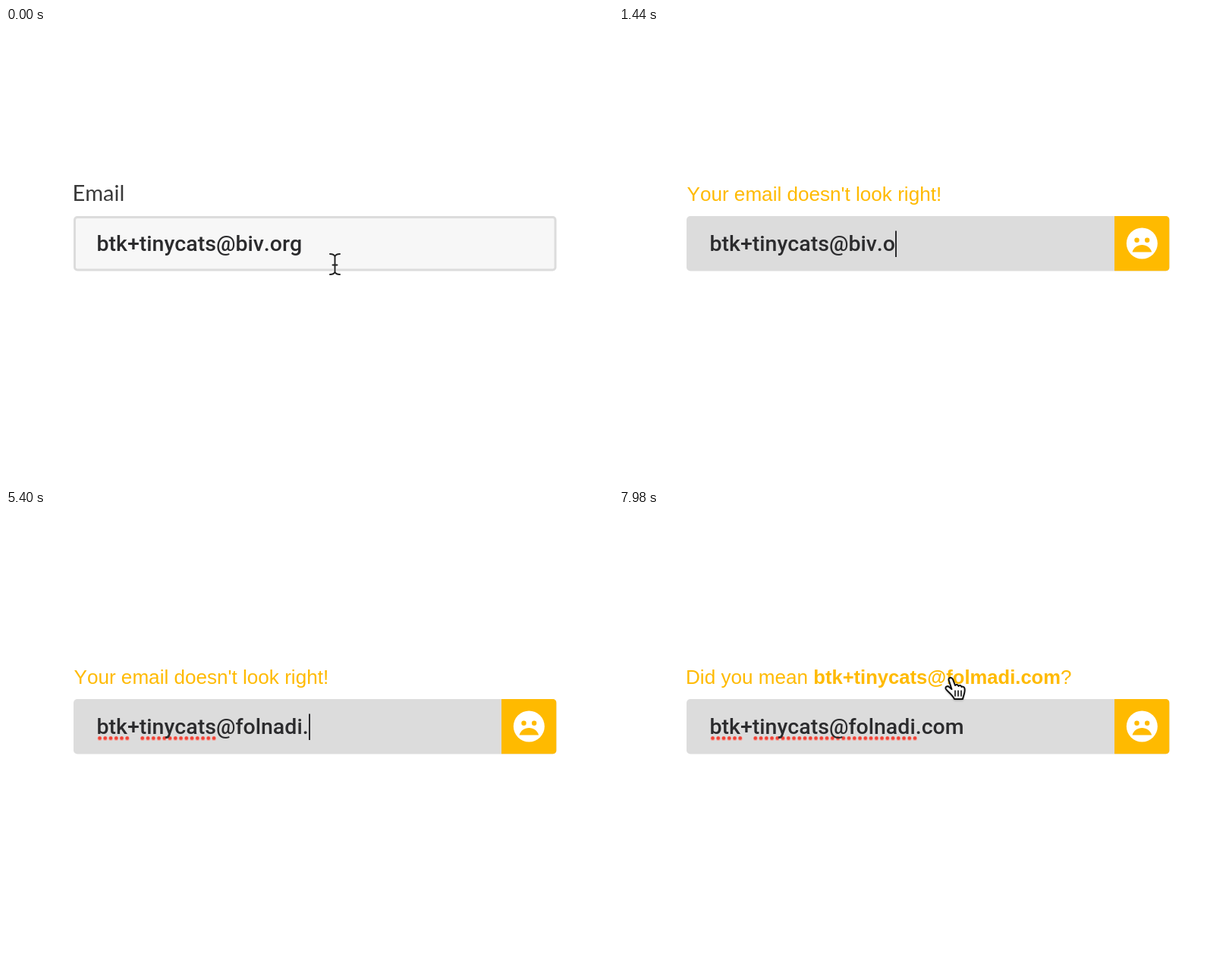
Write an HTML page with a canvas that moves like this. It is 800 by 600 pixels and loops after 8 s.

```html
<!DOCTYPE html>
<html lang="en">
<head>
<meta charset="utf-8">
<title>Email field</title>
<style>
  html, body { margin: 0; width: 100%; height: 100%; overflow: hidden; background: #fff; }
  canvas { display: block; }
</style>
</head>
<body>
<canvas id="stage" width="800" height="600"></canvas>
<script>
const ctx = document.getElementById("stage").getContext("2d");
ctx.fontKerning = "none";
const LOOP = 8000, BLINK = 560;
const AMBER = "#ffba00", GREY = "#dcdcdc", INK = "#2b2b2d";
const FIELD_FONT = "500 28.5px Roboto, sans-serif";
const BOX = { x: 89, y: 248, w: 636.5, h: 72.5, r: 5 };
const TEXT_X = 119.5;

const START_TEXT = "btk+tinycats@biv.org";
// Keystrokes as [time, key]; "<" is backspace.
const KEYS = [
  [1040, "<"], [1240, "<"], [1900, "<"], [2080, "<"], [2260, "<"], [2440, "<"], [2840, "<"],
  [3860, "f"], [4020, "o"], [4180, "l"], [4340, "n"], [4500, "a"], [4640, "d"], [4820, "i"],
  [5400, "."], [5620, "c"], [5840, "o"], [6080, "m"]
];

const clamp = v => Math.max(0, Math.min(1, v));
const span = (t, from, to) => clamp((t - from) / (to - from));
const easeOut = (p, power = 1.8) => 1 - (1 - p) ** power;
const smooth = p => p * p * (3 - 2 * p);
const mix = (a, b, p) => a + (b - a) * p;

const hand = new Path2D("M6 5C4 1 9-1 11 3L14 11C15 9 18 10 18.5 12C19.5 10 22 11 22.5 13" +
  "C24 12 26 13 26.5 15C27.5 20 25 24 24 29L13 29C11 24 5 20 2 16C0 13 4 11 6 13L9.5 16Z");
const handLines = new Path2D("M14 18v7M18 18v7M22 18v7");
const beam = new Path2D("M-6.5-13.5Q-1-13.5 0-10Q1-13.5 6.5-13.5M0-10V10M-3 1H3" +
  "M-6.5 13.5Q-1 13.5 0 10Q1 13.5 6.5 13.5");
const frown = new Path2D("M0 2C-6 2-11 5.5-12.8 11.5H12.8C11 5.5 6 2 0 2Z");

function write(text, x, y, font, color) {
  ctx.font = font;
  ctx.fillStyle = color;
  ctx.fillText(text, x, y);
  return x + ctx.measureText(text).width;
}

function dot(x, y, r, color) {
  ctx.fillStyle = color;
  ctx.beginPath();
  ctx.arc(x, y, r, 0, 7);
  ctx.fill();
}

function fieldWidth(text) {
  ctx.font = FIELD_FONT;
  return ctx.measureText(text).width;
}

function typedAt(t) {
  let text = START_TEXT, last = 480;
  for (const [time, key] of KEYS) {
    if (time > t) break;
    text = key === "<" ? text.slice(0, -1) : text + key;
    last = time;
  }
  return { text, last };
}

function drawLabel(t) {
  const out = span(t, 1040, 1230);
  if (out === 1) return;
  ctx.globalAlpha = 1 - out;
  write("Email", 87.5, 228 - 8 * out, "400 29px Lato, sans-serif", "#3a3a3a");
  ctx.globalAlpha = 1;
}

function drawMessage(t, shown) {
  const y = 228 + 72 * (1 - shown);
  const font = "26.1px 'Liberation Sans', Arial, sans-serif";
  ctx.globalAlpha = shown;
  if (t >= 1380 && t < 6120) {
    write("Your email doesn't look right!", 89.5, y, font, AMBER);
  } else {
    const guess = t < 1380 ? START_TEXT : "btk+tinycats@folmadi.com";
    let x = write("Did you mean ", 88, y, font, AMBER);
    x = write(guess, x, y, "bold 25.6px 'Liberation Sans', Arial, sans-serif", AMBER);
    write("?", x, y, font, AMBER);
  }
  ctx.globalAlpha = 1;
}

function drawBox(t) {
  const { x, y, w, h, r } = BOX;
  const level = Math.round(mix(247, 220, span(t, 440, 640)));
  ctx.fillStyle = GREY;
  ctx.beginPath();
  ctx.roundRect(x, y, w, h, r);
  ctx.fill();
  ctx.fillStyle = `rgb(${level},${level},${level})`;
  ctx.beginPath();
  ctx.roundRect(x + 3, y + 3, w - 6, h - 6, 2);
  ctx.fill();
}

function drawBadge(shown) {
  const { x, y, w, h, r } = BOX, shift = 72 * (1 - shown);
  ctx.save();
  ctx.beginPath();
  ctx.rect(x, y, w, h);
  ctx.clip();
  ctx.globalAlpha = shown;
  ctx.fillStyle = AMBER;
  ctx.beginPath();
  ctx.roundRect(653 + shift, y, x + w - 653, h, [0, r, r, 0]);
  ctx.fill();
  // The face fades in on top of the badge's own fade.
  ctx.globalAlpha = shown * shown;
  ctx.translate(689.3 + shift, 284 + shift);
  dot(0, 0, 20.5, "#fff");
  dot(-6.8, -4.3, 3.2, AMBER);
  dot(6.8, -4.3, 3.2, AMBER);
  ctx.fill(frown);
  ctx.restore();
}

function underline(before, word) {
  const start = TEXT_X + fieldWidth(before) + 1;
  const count = Math.round(fieldWidth(word) / 7.25);
  for (let i = 0; i < count; i++) {
    dot(start + 3 + i * 7.25, 299.9, 2.9, "#f6a39c");
    dot(start + 3 + i * 7.25, 299.5, 2.2, "#ee4438");
  }
}

function drawField(t) {
  const { text, last } = typedAt(t);
  if (t >= 1840) underline("", "btk");
  if (t >= 2700) underline("btk+", t < 6100 ? "tinycats" : "tinycats@folnadi");
  const end = write(text, TEXT_X, 293.5, FIELD_FONT, INK);
  if (t >= 480 && Math.floor((t - last) / BLINK) % 2 === 0) {
    ctx.fillStyle = INK;
    ctx.fillRect(Math.round(end), 267.5, 2, 34.5);
  }
}

function drawPointer(t) {
  let x, y;
  if (t < 1040) {
    const p = smooth(span(t, 20, 200));
    x = mix(433.5, 412, p);
    y = mix(311.5, 288, p);
  } else if (t >= 7440) {
    const p = smooth(span(t, 7440, 7980));
    x = mix(412, 437, p);
    y = mix(288, 220, p);
  } else return;

  ctx.save();
  ctx.lineCap = ctx.lineJoin = "round";
  if (y < 240) {
    ctx.translate(x - 8, y - 1);
    ctx.shadowColor = "rgba(0,0,0,.35)";
    ctx.shadowBlur = 3;
    ctx.shadowOffsetY = 1.5;
    ctx.fillStyle = "#fff";
    ctx.fill(hand);
    ctx.shadowColor = "transparent";
    ctx.strokeStyle = "#111";
    ctx.lineWidth = 2;
    ctx.stroke(hand);
    ctx.lineWidth = 1.6;
    ctx.stroke(handLines);
  } else {
    ctx.translate(x, y);
    ctx.strokeStyle = "#fff";
    ctx.lineWidth = 3.5;
    ctx.stroke(beam);
    ctx.strokeStyle = "#222";
    ctx.lineWidth = 2;
    ctx.stroke(beam);
  }
  ctx.restore();
}

function frame(now) {
  const t = now % LOOP;
  const shown = easeOut(span(t, 1240, 1440));
  ctx.fillStyle = "#fff";
  ctx.fillRect(0, 0, 800, 600);
  drawLabel(t);
  if (shown > 0) drawMessage(t, shown);
  drawBox(t);
  if (shown > 0) drawBadge(shown);
  drawField(t);
  drawPointer(t);
  requestAnimationFrame(frame);
}
requestAnimationFrame(frame);
</script>
</body>
</html>
```
